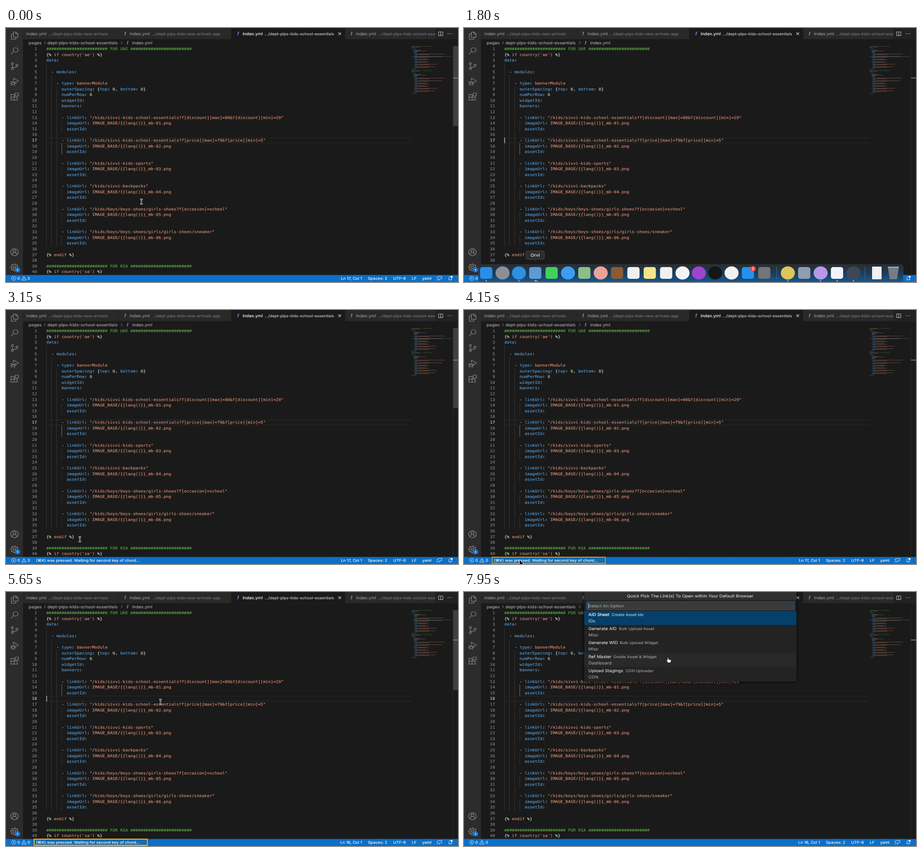
These frames come from a looping animation (998 px wide and 561 px high, 8 s). An HTML page with a canvas:

```html
<!DOCTYPE html>
<html lang="en">
<head>
<meta charset="utf-8">
<title>Editor quick pick</title>
<style>
  html, body { margin: 0; width: 100%; height: 100%; overflow: hidden; background: #1a1a1a; }
  canvas { display: block; width: 998px; height: 561px; }
</style>
</head>
<body>
<canvas id="stage" width="998" height="561"></canvas>
<script>
const ctx = document.getElementById('stage').getContext('2d');
const LOOP = 8000;
// The 1280 x 800 desktop is shown in a 998 x 561 picture.
const SX = 998 / 1280, SY = 561 / 800;
const px = x => x / SX, py = y => y / SY;
const MONO = '12px "DejaVu Sans Mono", monospace';
const ui = (size = 12.65, weight = 400) => `${weight} ${size}px Inter, sans-serif`;
const CHAR = 7.224, ROW = 18, TOP = 57, LEFT = 114;
const C = {
  bg: '#1a1a1a', panel: '#232324', tab: '#292929', bar: '#0b70c8', plain: '#d4d4d4',
  key: '#539bd8', str: '#d38b70', num: '#b5cea8', note: '#559c42', icon: '#858585'
};

const clamp = v => Math.max(0, Math.min(1, v));
const ease = v => v * v * (3 - 2 * v);
const ramp = (t, a, b) => ease(clamp((t - a) / (b - a)));

function rect(x, y, w, h, color) {
  ctx.fillStyle = color;
  ctx.fillRect(x, y, w, h);
}

// A hairline outline gives the text its slightly heavier desktop weight.
function text(s, x, y, color, font = ui(), align = 'left') {
  ctx.font = font;
  ctx.fillStyle = ctx.strokeStyle = color;
  ctx.textAlign = align;
  ctx.lineWidth = 0.25;
  ctx.fillText(s, x, y + 4.4);
  ctx.strokeText(s, x, y + 4.4);
}

function stroke(d, x, y, color, width = 1.5, scale = 1) {
  ctx.save();
  ctx.translate(x - 12 * scale, y - 12 * scale);
  ctx.scale(scale, scale);
  ctx.strokeStyle = color;
  ctx.lineWidth = width;
  ctx.stroke(new Path2D(d));
  ctx.restore();
}

function round(x, y, w, h, r, color) {
  ctx.beginPath();
  ctx.roundRect(x, y, w, h, r);
  ctx.fillStyle = color;
  ctx.fill();
}

function disc(x, y, r, color) {
  ctx.beginPath();
  ctx.arc(x, y, r, 0, 7);
  ctx.fillStyle = color;
  ctx.fill();
}

// ---- Document ----
const links = [
  'sivvi-kids-school-essentials?f[discount][max]=89&f[discount][min]=29',
  'sivvi-kids-school-essentials?f[price][max]=79&f[price][min]=5',
  'sivvi-kids-sports',
  'sivvi-backpacks',
  'boys/boys-shoes/girls-shoes?f[occasion]=school',
  'boys/boys-shoes/girls/girls-shoes/sneaker'
];

function section(land, code) {
  const hash = '#'.repeat(24);
  const out = [
    `${hash} FOR ${land} ${hash}`, `{% if country('${code}') %}`, 'data:', '',
    '  - modules:', '', '    - type: bannerModule',
    '      outerSpacing: {top: 0, bottom: 0}', '      numPerRow: 6',
    '      widgetId:', '      banners:', ''
  ];
  links.forEach((link, i) => out.push(
    `      - linkUrl: "/kids/${link}"`,
    `        imageUrl: IMAGE_BASE/{{lang()}}_mb-0${i + 1}.png`,
    '        assetId:', ''));
  return out.concat('{% endif %}', '');
}

function tokens(line) {
  const out = [];
  let col = 0;
  const add = (s, color) => {
    if (s.trim()) out.push({ s, col, color });
    col += s.length;
  };
  if (line[0] === '#') add(line, C.note);
  else if (line[0] === '{') {
    add('{%', C.plain);
    add(line.slice(2, -2), C.str);
    add('%}', C.plain);
  } else {
    const m = line.match(/^(\s*(?:- )?)(\w+)(:)(.*)$/);
    if (!m) return out;
    add(m[1], C.plain);
    add(m[2], C.key);
    add(m[3], C.plain);
    if (/^ [{\d]/.test(m[4])) {
      for (const p of m[4].match(/\w+|\W+/g)) {
        add(p, /\d/.test(p) ? C.num : /\w/.test(p) ? C.key : C.plain);
      }
    } else add(m[4], C.str);
  }
  return out;
}

const doc = [...section('UAE', 'ae'), ...section('KSA', 'sa')].map(tokens);
const lineY = n => TOP + (n - 1) * ROW;

// ---- Workbench ----
const bang = (x, y, size = 15) =>
  text('!', x, y, '#a46fd0', 'italic 700 ' + size + 'px "DejaVu Sans", sans-serif', 'center');

function tab(x, w, titleX, folder, active) {
  rect(x, 0, w, 35, active ? C.bg : C.tab);
  ctx.save();
  ctx.beginPath();
  ctx.rect(x, 0, w, 35);
  ctx.clip();
  if (titleX > 60) bang(titleX - 12.5, 18);
  text('index.yml', titleX, 18, active ? '#f2f2f2' : '#929292');
  text('.../' + folder, titleX + 62.5, 18, active ? '#c4c4c4' : '#747474', ui(11.6));
  ctx.restore();
}

function tabs() {
  rect(48, 0, 1232, 35, '#222');
  tab(48, 269, 57.5, 'dept-plps-kids-new-arrivals');
  tab(318, 319, 350, 'dept-plps-kids-new-arrivals-app');
  tab(638, 322, 670, 'dept-plps-kids-school-essentials', true);
  tab(961, 255, 991, 'dept-plps-kids-school-essentials');
  rect(1216, 0, 64, 35, '#222');
  stroke('M8 8L16 16M16 8L8 16', 945, 18, '#ddd', 1.4);
  stroke('M6 6h12v12h-12zM12 6v12', 1231, 18, '#ccc', 1.3);
  for (let i = -1; i < 2; i++) disc(1257 + i * 5, 18, 1.1, '#ccc');

  const grey = '#a0a0a0';
  text('pages', px(50), 46.5, grey);
  text('dept-plps-kids-school-essentials', px(91.5), 46.5, grey);
  text('index.yml', px(278.5), 46.5, grey);
  bang(px(268.5), 46.5, 14);
  for (const x of [86, 255.5]) stroke('M10 8l4 4-4 4', px(x), 46.5, grey, 1.2);
}

const sideIcons = [
  [24, 'M9 1h8l5 5v11h-13zM16 1v6h6M9 7h-6v16h13v-6'],
  [72, 'M22 9a7 7 0 1 1-14 0a7 7 0 1 1 14 0M10 14L2 23'],
  [120, 'M9 4a3 3 0 1 1-6 0a3 3 0 1 1 6 0M9 20a3 3 0 1 1-6 0a3 3 0 1 1 6 0M22 9a3 3 0 1 1-6 0a3 3 0 1 1 6 0M6 7v10M19 12c0 4-4 4-7 4s-6 0-6 2'],
  [168, 'M9 10V2l14 9-9 7M12 18a4 5 0 1 1-8 0a4 5 0 1 1 8 0M4 16h8M1 12l3 3M15 12l-3 3M0 19h4M12 19h4M2 25l3-3M14 25l-3-3'],
  [216, 'M2 5h9v9h9v9h-18zM2 14h9v9M14 1h9v9h-9z'],
  [706, 'M23 12a11 11 0 1 1-22 0a11 11 0 1 1 22 0M16 9a4 4 0 1 1-8 0a4 4 0 1 1 8 0M5 20c1-9 13-9 14 0']
];

function sidebar() {
  rect(0, 0, 48, 778, '#2c2c2c');
  for (const [y, d] of sideIcons) stroke(d, 24, y, C.icon, 1.7);
  ctx.strokeStyle = C.icon;
  ctx.lineWidth = 1.8;
  ctx.beginPath();
  for (let i = 0; i <= 32; i++) {
    const a = i / 32 * Math.PI * 2, r = i % 4 < 2 ? 11 : 8;
    ctx.lineTo(24 + r * Math.cos(a), 754 + r * Math.sin(a));
  }
  ctx.stroke();
  ctx.beginPath();
  ctx.arc(24, 754, 3.5, 0, 7);
  ctx.stroke();
  disc(32.5, 762, 8, '#1673ca');
  text('1', 32.5, 761.5, '#fff', ui(9, 600), 'center');
}

function guide(col, from, to, color = '#3b3b3b') {
  rect(LEFT + col * CHAR, lineY(from), 1.1, (to - from + 1) * ROW, color);
}

function editor(t, line, picking) {
  rect(48, 35, 1232, 743, C.bg);
  rect(LEFT, lineY(line), 1034, 1.6, '#292929');
  rect(LEFT, lineY(line) + 16.4, 1034, 1.6, '#292929');
  guide(0, 4, 35);
  guide(2, 6, 35);
  guide(4, 8, 35);
  for (let n = 14; n < 35; n += 4) guide(6, n, n + 1);
  const open = line === 17 ? 18 : 14;
  guide(6, open, open + 1, '#7a7a7a');

  for (let n = 1; n <= 40; n++) {
    const y = lineY(n) + 8.7;
    text(n, 88, y, n === line ? '#c8c8c8' : '#828282', MONO, 'right');
    for (const k of doc[n - 1]) text(k.s, LEFT + k.col * CHAR, y, k.color, MONO);
  }
  const blink = line === 17 ? (t + 600) % 1000 < 500 : true;
  if (!picking && blink) rect(LEFT, lineY(line), 2, ROW, '#b8b8b8');
}

function minimap(t, line) {
  rect(1149, TOP + (line - 1) * 2, 114, 2, '#203f57');
  ctx.globalAlpha = 0.45;
  doc.forEach((row, i) => {
    for (const k of row) {
      for (const m of k.s.matchAll(/\S+/g)) {
        rect(1149 + k.col + m.index, TOP + i * 2 + 0.3, m[0].length, 1.3, k.color);
      }
    }
  });
  const shown = 1 - ramp(t, 1200, 1650) + ramp(t, 2850, 3000) - ramp(t, 3650, 4050)
    + ramp(t, 4650, 4800) - ramp(t, 6200, 6700);
  ctx.globalAlpha = clamp(shown);
  rect(1266, TOP, 14, 252, '#404040');
  ctx.globalAlpha = 1;
  rect(1265.5, TOP, 1, 721, '#2b2b2b');
  rect(1266, line === 17 ? 156.5 : 150, 14, 2.4, '#858585');
}

function statusBar(t, line) {
  const y = 788.5, white = '#f4f8fc', font = ui(11.7);
  rect(0, 778, 1280, 22, C.bar);
  stroke('M19 12a7 7 0 1 1-14 0a7 7 0 1 1 14 0M9 9l6 6M15 9l-6 6', px(17), y, white, 1.2, 0.9);
  text('0', px(25), y, white, font);
  stroke('M12 5l7 13h-14zM12 9v5M12 15v1.5', px(39.5), y, white, 1.2, 0.95);
  text('0', px(47.5), y, white, font);
  if (t >= 2950 && t < 5800) {
    text('(⌘K) was pressed. Waiting for second key of chord...', px(66), y, white,
      '11.7px Inter, "DejaVu Sans", sans-serif');
  }
  text(`Ln ${line}, Col 1`, px(786), y, white, font, 'right');
  text('Spaces: 2', px(799), y, white, font);
  text('UTF-8', px(855), y, white, font);
  text('LF', px(896), y, white, font);
  text('yaml', px(919), y, white, font);
  stroke('M9 6h9v7h-3l-3 3v-3M9 8h-4v5M4 19c0-6 7-6 7 0', px(957.5), y, white, 1.2);
  stroke('M7 16c2-2 1-4 1-6c0-5 8-5 8 0c0 2-1 4 1 6zM11 18h2', px(981), y, white, 1.2);
  disc(px(984), y - 4.5, 3, white);
}

function marker(t) {
  if (t >= 5800) return;
  ctx.globalAlpha = ramp(t, 3600, 4400);
  ctx.strokeStyle = '#e2b02a';
  ctx.lineWidth = 2.6;
  ctx.shadowColor = 'rgba(0,0,0,.6)';
  ctx.shadowBlur = 3;
  ctx.strokeRect(62, 546, 250, 13.5);
  ctx.shadowBlur = 0;
  ctx.globalAlpha = 1;
}

// ---- Quick pick ----
const LIST = 60, OPTION = 44;
const options = [
  ['AID Sheet', 'Create Asset Ids', 'IDs', 326],
  ['Generate AID', 'Bulk Upload Asset', 'Misc', 342],
  ['Generate WID', 'Bulk Upload Widget', 'Misc', 344],
  ['Ref Master', 'Onsite Asset & Widget', 'Dashboard', 330],
  ['Upload Stagings', 'CDN Uploader', 'CDN', 357]
];
const rowAt = y => Math.floor((py(y) - LIST) / OPTION);

function quickPick(t, cursor) {
  ctx.shadowColor = '#000';
  ctx.shadowBlur = 7;
  rect(340.5, 0, 601, 282, C.panel);
  ctx.shadowBlur = 0;
  rect(340.5, 0, 601, 25, '#2f2f30');
  text('Quick Pick The Link(s) To Open within Your Default Browser', 640.5, 12, '#cfcfcf', ui(), 'center');
  rect(346.5, 31, 589, 25, '#393939');
  ctx.strokeStyle = C.bar;
  ctx.lineWidth = 1.2;
  ctx.strokeRect(347, 31, 588, 24.5);
  text('Select An Option', 352.5, 43.5, '#999');
  if ((t - 5800) % 1000 < 500) rect(352, 35, 1.3, 17, '#ddd');
  const hover = rowAt(cursor.y);
  options.forEach(([label, about, detail, x], i) => {
    const y = LIST + i * OPTION;
    if (i === 0) rect(340.5, y, 601, OPTION, '#05406a');
    else if (i === hover) rect(340.5, y, 601, OPTION, '#282929');
    text(label, 352.5, y + 11.5, i ? '#d4d4d4' : '#fff');
    text(about, px(x), y + 11.5, i ? '#9b9b9b' : '#b5c7d5', ui(11.6));
    text(detail, 352.5, y + 31.5, i ? '#9b9b9b' : '#b5c7d5');
  });
}

// ---- Dock: each icon is a plain square (s) or circle (c) ----
const apps = ('s2a8ee8 c8b9096 c2f8fe0 s5d9bd2 s42cf5c c3f9cf2 s8cbf86 ce9a39a s8a5b35 sf0f0ee sf6e48a sf1f1f1 ' +
  'cf4f4f6 c9b45cf c161616 cf1f1f3 s2491ee s73757a').split(' ');
const tools = 'cdcc65a s8f9fae cb996e8 seef4fa c3f4653'.split(' ');

function appIcon(spec, x) {
  const color = '#' + spec.slice(1);
  if (spec[0] === 'c') {
    ctx.beginPath();
    ctx.ellipse(x, 541, 15.5, 14.5, 0, 0, 7);
    ctx.fillStyle = color;
    ctx.fill();
  } else round(x - 13.5, 528, 27, 26, 5, color);
}

function dock(t) {
  const up = ramp(t, 1450, 1700) - ramp(t, 2600, 2850);
  if (up <= 0) return;
  ctx.save();
  ctx.translate(0, 42 * (1 - up));
  const shade = ctx.createLinearGradient(0, 523, 0, 561);
  shade.addColorStop(0, '#282e34');
  shade.addColorStop(0.45, '#1d3a55');
  shade.addColorStop(1, '#17578f');
  round(32, 522.5, 938, 48, 6, shade);
  ctx.strokeStyle = 'rgba(150,165,180,.2)';
  ctx.lineWidth = 0.7;
  ctx.stroke();
  apps.forEach((a, i) => appIcon(a, 49 + i * 36.12));
  tools.forEach((a, i) => appIcon(a, 715 + i * 36.2));
  disc(638, 532, 6.2, '#ee463f');
  text('3', 638, 530.6, '#fff', ui(8.5), 'center');
  rect(690, 528, 1, 27, '#526c82');
  rect(885, 528, 1, 27, '#526c82');
  round(901, 527, 21, 28, 1, '#f0f0f1');
  ctx.beginPath();
  ctx.moveTo(936, 529);
  ctx.lineTo(960, 529);
  ctx.lineTo(956, 555);
  ctx.lineTo(940, 555);
  ctx.closePath();
  ctx.fillStyle = '#777d82';
  ctx.fill();
  rect(936, 527, 24, 2.5, '#a4a9ad');
  for (const x of [49, 121, 157, 715, 787, 824, 860]) disc(x, 558.3, 1.3, '#c3d0da');
  ctx.restore();
}

function dockLabel(t) {
  if (t < 1800 || t >= 2600) return;
  round(137, 492.5, 40.5, 18.5, 3.5, '#2c2d2e');
  ctx.strokeStyle = '#555657';
  ctx.lineWidth = 0.8;
  ctx.stroke();
  ctx.beginPath();
  ctx.moveTo(152, 510.5);
  ctx.lineTo(157, 515);
  ctx.lineTo(162, 510.5);
  ctx.fillStyle = '#2c2d2e';
  ctx.fill();
  ctx.save();
  ctx.translate(157.2, 501.5);
  ctx.scale(SX, SY);
  text('Orvi', 0, 0.3, '#eee', ui(13.6), 'center');
  ctx.restore();
}

// ---- Pointer: [time, x, y] ----
const path = [
  [0, 299, 383], [250, 299, 383], [1150, 204, 550], [1500, 170, 558], [1900, 158, 558],
  [2450, 158, 558], [2900, 163, 506], [3250, 163, 506], [4000, 123, 552], [4450, 123, 552],
  [5350, 341, 242], [6000, 341, 242], [7000, 450, 146], [LOOP, 450, 146]
];

function pointerAt(t) {
  const i = path.findIndex(p => p[0] > t);
  const [t0, x0, y0] = path[i - 1], [t1, x1, y1] = path[i];
  const k = ramp(t, t0, t1);
  return { x: x0 + (x1 - x0) * k, y: y0 + (y1 - y0) * k };
}

function pointer({ x, y }, picking) {
  ctx.save();
  ctx.translate(x, y);
  ctx.lineJoin = 'round';
  const inList = picking && x > 266 && x < 734 && y < 198;
  if (inList) {
    ctx.scale(SX, SY);
    const hand = new Path2D('M-1 0c0-2 3-2 3 0v4l6 1.5c2 .5 1.5 4 .5 6l-1 3h-7l-4-6c-1-2 1-3 2.5-1z');
    ctx.fillStyle = '#fff';
    ctx.strokeStyle = '#111';
    ctx.lineWidth = 1;
    ctx.fill(hand);
    ctx.stroke(hand);
  } else if (y >= 545) {
    const arrow = new Path2D('M0 0v11.5l2.5-2.2 1.9 3.9 2-.9-1.9-3.7h3.5z');
    ctx.strokeStyle = '#fff';
    ctx.lineWidth = 1.6;
    ctx.stroke(arrow);
    ctx.fillStyle = '#000';
    ctx.fill(arrow);
  } else {
    const beam = new Path2D('M-2.8-5q2.8 0 2.8 1.8q0-1.8 2.8-1.8M0-3.2v7M-2.8 5.6q2.8 0 2.8-1.8q0 1.8 2.8 1.8M-1.3 1.5h2.6');
    ctx.strokeStyle = '#eee';
    ctx.lineWidth = 2.6;
    ctx.stroke(beam);
    ctx.strokeStyle = '#111';
    ctx.lineWidth = 0.9;
    ctx.stroke(beam);
  }
  ctx.restore();
}

function draw(t) {
  const line = t < 5500 ? 17 : 16;
  const picking = t >= 5800;
  const cursor = pointerAt(t);
  ctx.setTransform(SX, 0, 0, SY, 0, 0);
  ctx.textBaseline = 'alphabetic';
  ctx.textRendering = 'geometricPrecision';
  ctx.lineJoin = 'round';
  editor(t, line, picking);
  minimap(t, line);
  tabs();
  sidebar();
  ctx.lineJoin = 'miter';
  statusBar(t, line);
  if (picking) quickPick(t, cursor);
  ctx.setTransform(1, 0, 0, 1, 0, 0);
  marker(t);
  dock(t);
  dockLabel(t);
  pointer(cursor, picking);
}

const start = performance.now();
function tick(now) {
  draw(Math.max(0, now - start) % LOOP);
  requestAnimationFrame(tick);
}
draw(0);
requestAnimationFrame(tick);
</script>
</body>
</html>
```
